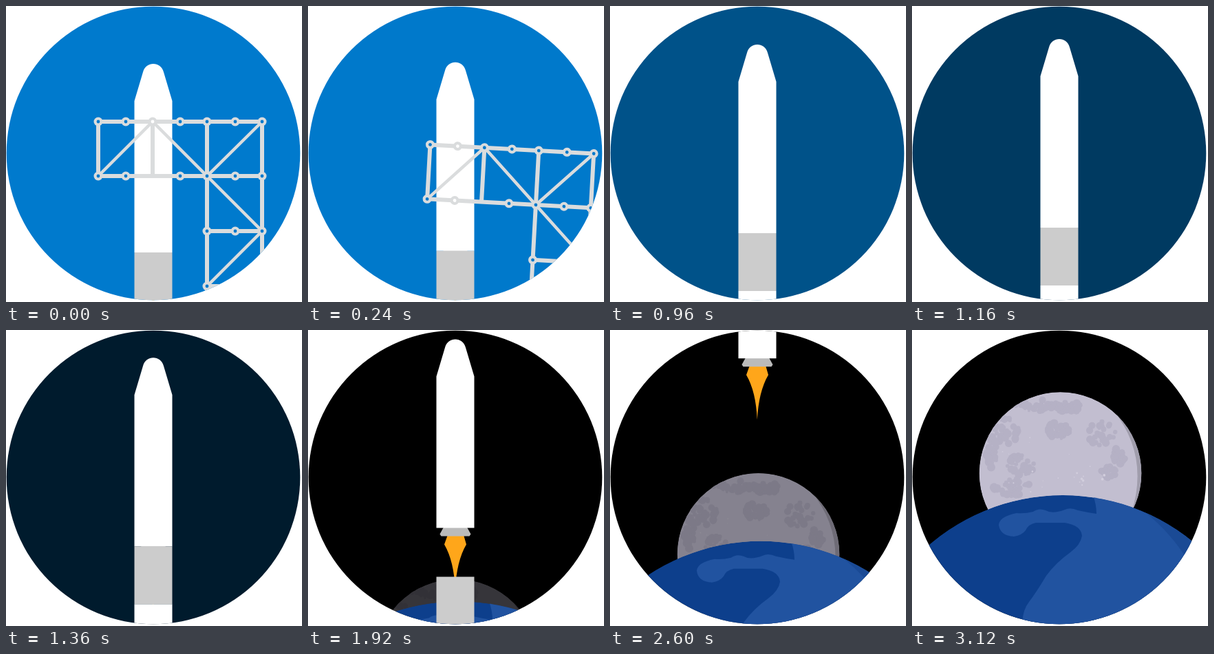
Recreate the animation shown at these times as an HTML page. Size 430x430 px, loop 3160 ms.

```html
<!DOCTYPE html>
<html lang="en">
<head>
<meta charset="utf-8">
<title>Rocket launch</title>
<style>
  html, body { margin: 0; width: 100%; height: 100%; overflow: hidden; background: #fff; }
  svg { display: block; width: 430px; height: 430px; }
</style>
</head>
<body>
<svg viewBox="0 0 430 430">
  <defs>
    <clipPath id="porthole"><circle cx="214" cy="214" r="213.3"/></clipPath>
    <clipPath id="disc"><circle cx="215.5" cy="118" r="117.8"/></clipPath>
    <clipPath id="globe"><circle cx="219" cy="298" r="298"/></clipPath>
    <mask id="holes" maskUnits="userSpaceOnUse" x="100" y="140" width="320" height="420">
      <path fill="#fff" d="M100 140h320v420h-320z"/>
      <g id="holeDots"/>
    </mask>
  </defs>
  <g clip-path="url(#porthole)">
    <rect id="sky" width="430" height="430"/>

    <g id="moon">
      <g clip-path="url(#disc)">
        <circle cx="215.5" cy="118" r="118" fill="#c2bed0"/>
        <g id="maria" fill="#b5b1c5"/>
        <g id="craters" fill="#d2cedd"/>
        <path d="M292 26Q345 92 319 175L340 175V26z" fill="#a09dac"/>
      </g>
    </g>

    <g id="earth">
      <g clip-path="url(#globe)">
        <circle cx="219" cy="298" r="298" fill="#0d3f8c"/>
        <path fill="#2153a0" d="M263 0Q268 14 268 27Q254 25 241 22Q230 17 222 21Q204 28 194 22Q184 18 176 24
          Q164 27 152 26Q127 31 126 43Q128 59 148 60Q160 58 165 51Q169 42 180 40H222Q246 44 247 59
          Q245 72 230 83Q209 98 195 117Q180 142 170 155Q159 169 161 190V240H520V0z"/>
        <path fill="#1a4a95" d="M332 20Q368 46 395 86L450 150V20z"/>
      </g>
    </g>

    <g id="stage">
      <path fill="#ffa61a" d="M203 284L198 298Q212 322 213.8 363Q216 322 230 298L226 284z"/>
      <path fill="#bbb" d="M197 273H231L236.500 283L234.500 286H193.500L191.500 283z"/>
      <path fill="#fff" d="M186.500 274V54L199 12C203-4 225-4 229 12L241.500 54V274z"/>
    </g>

    <g id="booster">
      <path fill="#fff" d="M186.500 84h55v400h-55z"/>
      <path fill="#ccc" d="M186.500 0h55v84h-55z"/>
    </g>

    <g id="tower" mask="url(#holes)" stroke="#dadcdd" fill="none">
      <path stroke-width="6" d="M134 168H372M134 247H372M292 327H372M292 407H372M134 168V247M213 168V247M292 168V540M372 168V540"/>
      <path stroke-width="4.500" d="M134 247L213 168L292 247L372 168M292 247L372 327L292 407"/>
      <g id="joints" fill="#dadcdd" stroke="none"/>
    </g>
  </g>
</svg>
<script>
const LOOP = 3160, STEP = 40, SPLIT = 1665, BURN = 1800, CRUISE = 2600;
const el = id => document.getElementById(id);
const move = (id, y) => el(id).setAttribute('transform', `translate(0 ${y})`);
const dot = (x, y, r) => `<circle cx="${x}" cy="${y}" r="${r}"/>`;

// Tower joints are rings whose centres show what is behind.
const joints = [];
for (const x of [134, 174, 213, 253, 292, 333, 372])
  for (const y of [168, 247, 327, 407])
    if ((y < 300 || x > 290) && !(x === 213 && y === 247)) joints.push([x, y]);
el('joints').innerHTML = joints.map(([x, y]) => dot(x, y, 6.5)).join('');
el('holeDots').innerHTML = joints.map(([x, y]) => dot(x, y, 2.4)).join('');

let seed = 11;
const random = () => (seed = seed * 16807 % 2147483647) / 2147483647;
const scatter = (x, y, w, h, n, size) => Array.from({ length: n }, () => {
  const a = random() * 2 * Math.PI, d = Math.sqrt(random());
  return dot(x + Math.cos(a) * d * w, y + Math.sin(a) * d * h, size * (0.4 + random()));
}).join('');

// Each patch: centre x, centre y, half width, half height.
const patches = [[180, 20, 32, 9], [226, 22, 24, 7], [136, 58, 20, 20], [115, 88, 9, 24],
  [158, 107, 20, 15], [213, 56, 17, 13], [276, 62, 20, 20], [285, 117, 14, 10], [145, 138, 26, 13],
  [301, 92, 10, 12]];
el('maria').innerHTML = patches.map(([x, y, w, h]) => scatter(x, y, w, h, 34, 4.5)).join('');
el('craters').innerHTML = scatter(255, 120, 26, 16, 9, 1.4) + scatter(190, 105, 70, 60, 12, 1.2);

function climb(t) {
  const lift = t < 480 ? 0.039 * t * t / 960 : 0.039 * (t - 240);
  const burn = Math.max(0, Math.min(t, CRUISE) - BURN);
  return lift + 0.000351 * burn * burn + 0.56 * Math.max(0, t - CRUISE);
}

function draw(t) {
  const light = Math.max(0, 1 - (t / 1504) ** 2.47);
  el('sky').setAttribute('fill', `rgb(0,${Math.round(122 * light)},${Math.round(205 * light)})`);

  const fall = (t / 520) ** 1.7;
  el('tower').setAttribute('transform',
    `translate(${93 * fall} ${163 * fall}) rotate(${11.7 * fall} 332 500)`);
  el('tower').style.display = t < 900 ? '' : 'none';

  move('stage', 84 - climb(t));
  const drop = 56 * (Math.max(0, t - SPLIT) / 255) ** 1.5;
  move('booster', 358 - climb(Math.min(t, SPLIT)) + drop);

  const left = 3120 - t;
  move('earth', 240 + 0.1285 * left);
  move('moon', 90 + 0.2265 * left);
  el('moon').setAttribute('opacity', Math.max(0, Math.min(1, 1 - 0.0006 * left)));
  for (const id of ['earth', 'moon']) el(id).style.display = t < 1600 ? 'none' : '';
}

const start = performance.now();
function tick() {
  const t = (performance.now() - start) % LOOP;
  draw(Math.floor(t / STEP) * STEP);
  requestAnimationFrame(tick);
}
tick();
</script>
</body>
</html>
```
